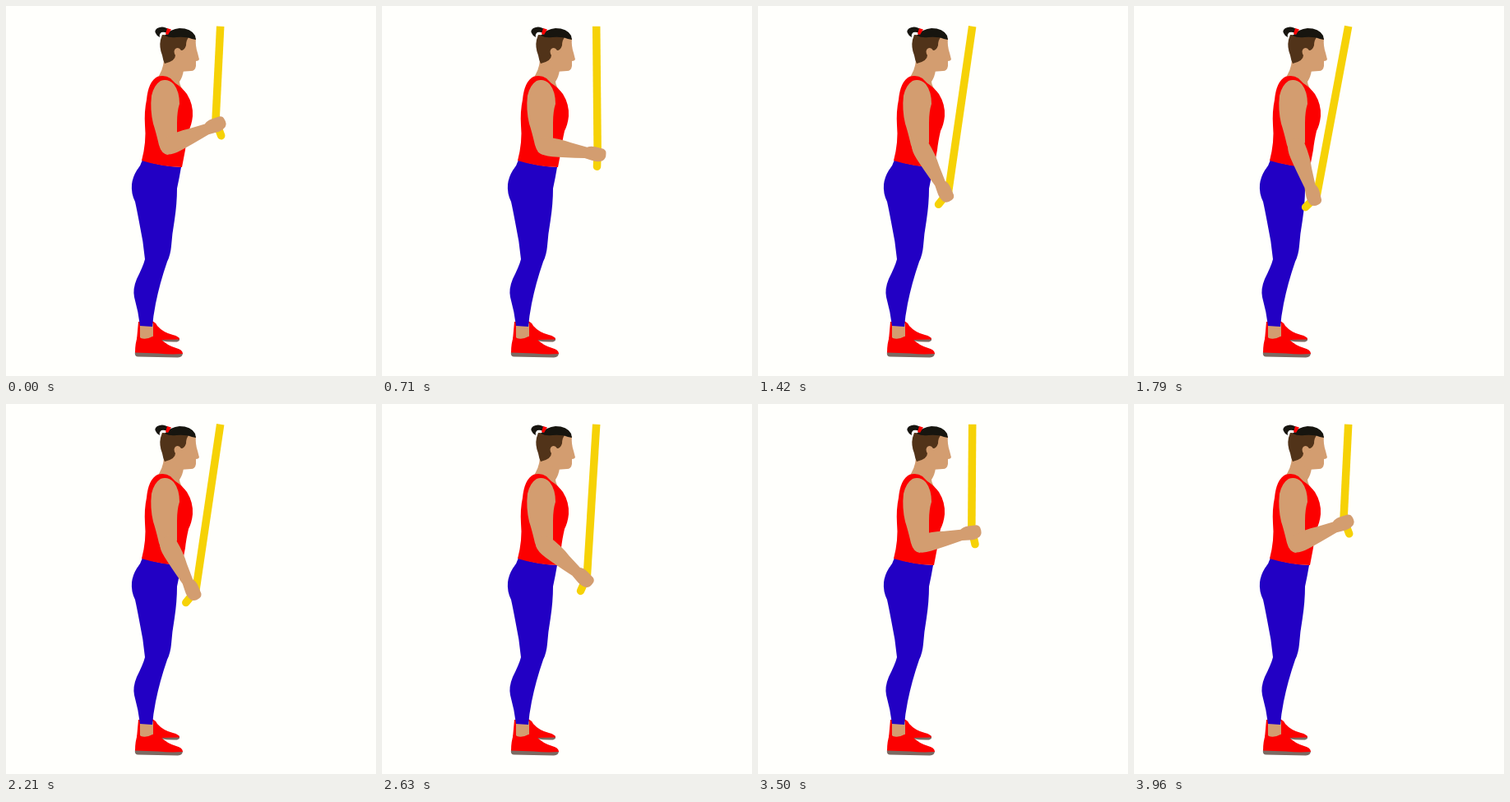
Recreate the animation shown at these times as an HTML page with a canvas. Size 450 by 450 pixels, loop 4000 ms.

```html
<!DOCTYPE html>
<html lang="en">
<head>
<meta charset="utf-8">
<title>Rope pushdown</title>
<style>
html, body { margin: 0; width: 100%; height: 100%; overflow: hidden; background: #fffffc; }
canvas { display: block; width: 450px; height: 450px; }
</style>
</head>
<body>
<canvas id="stage" width="450" height="450"></canvas>
<script>
const ctx = document.getElementById('stage').getContext('2d');
const LOOP = 4000, DOWN = 1780;
const UP_ANGLE = -24, SWING = 94.5;
const RAD = Math.PI / 180;
const ELBOW = { x: 197, y: 170.5 };
const GRIP = { x: 66, y: -4 };
const PAPER = '#fffffc', SKIN = '#d39d70', RED = '#fc0000', BLUE = '#2200c4';
const HAIR = '#513319', DARK = '#17150f', SOLE = '#7b6a62', ROPE = '#f6d206';

const shape = (color, d) => ({ color, path: new Path2D(d) });

const body = [
  // far shoe
  shape(SOLE, 'M186 403 L210 403 Q213 407 208 408.5 Q198 409 188 407Z'),
  shape(RED, 'M161 384 L178 383 Q182 385 184 389 Q191 397 203 400 Q211 402 211 405.5 L188 406 L159 406Z'),
  // near leg
  shape(SKIN, 'M163 386 L179 386 L179 406 L163 407Z'),
  shape(SOLE, 'M157 420 Q156 426 160 426.5 L209 427.5 Q215 427 215 422Z'),
  shape(RED, 'M160 402 Q162 401 164 404 Q171 406 178 402 Q184 400 187 404 Q196 413 207 416 Q215 418 215 423 Q200 424 185 422.5 L157 421.5 Q157 410 160 402Z'),
  shape(BLUE, 'M166 187 Q188 195 213 196 Q211 208 208 222 Q208 240 205 260 Q202 277 201 292 Q200 303 196 311 Q187 337 182 362 Q179 377 178 390 L163 389 Q161 372 156 354 Q154 344 159 332 Q167 316 169 308 Q167 286 162 263 Q159 247 157 238 Q152 228 153 217 Q154 208 159 200 Q164 194 166 187Z'),
  // neck and chest
  shape(SKIN, 'M192 66 Q191 79 183 89 L203 98 L220 108 Q211 98 211 92 Q215 86 216 78 L212 62Z'),
  // vest
  shape(RED, 'M171 114 Q173 92 184 86 Q193 83 200 88 L206 94 Q214 99 220 107 Q228 120 227 134 Q226 144 222 152 Q219 165 218 175 L214 196 Q187 195 165 188 Q171 165 169 145 Q168 128 171 114Z'),
  // head
  shape(SKIN, 'M207 38 L231 39 Q230 48 233 57 L235 65 Q234 67 231 67 L231 73 Q230 79 225 79 L211 80 L200 66Z'),
  shape(HAIR, 'M190 35 L223 37 Q219 41 219 48 Q217 54 213 54 Q210 49 206 52 Q203 55 206 60 Q206 67 193 70 Q191 66 190 60 Q186 50 188 41Z'),
  shape(DARK, 'M193 36 Q200 28 211 27 Q225 27 230 36 L231 41 L226 40 Q219 37 207 38 Q199 39 193 36Z'),
  shape(DARK, 'M199 29 Q191 23 184 27 Q180 30 182 33 Q183 36 187 38 Q186 34 189 32 Q192 31 196 33Z'),
  shape(RED, 'M196 27 L201 28.5 L197 35 L194 34Z')
];

const upperArm = shape(SKIN, 'M177 109 Q180 96 188 91 Q197 88 204 95 Q211 104 211 119 Q208 128 208 142 L208 166 L197 181 Q189 180 186 169 Q182 152 179 143 Q175 126 177 109Z');
// drawn along x, starting at the elbow
const forearm = shape(SKIN, 'M0 -11 Q18 -12 32 -9 L52 -6.5 Q56 -9 62 -8.5 L72 -7.5 Q76 -6 76 -2 Q77 4 73 7 Q67 10 60 8.5 L51 7 Q26 10 12 11 Q0 12 -6 8 Q-13 -1 -6 -8Z');

function fill(s) {
  ctx.fillStyle = s.color;
  ctx.fill(s.path);
}

function forearmAngle(t) {
  const phase = t < DOWN ? t / DOWN : 1 + (t - DOWN) / (LOOP - DOWN);
  return UP_ANGLE + SWING * (1 - Math.cos(Math.PI * phase)) / 2;
}

function line(x1, y1, x2, y2) {
  ctx.beginPath();
  ctx.moveTo(x1, y1);
  ctx.lineTo(x2, y2);
  ctx.stroke();
}

function drawRope(angle) {
  const c = Math.cos(angle * RAD), s = Math.sin(angle * RAD);
  const x = ELBOW.x + GRIP.x * c - GRIP.y * s;
  const y = ELBOW.y + GRIP.x * s + GRIP.y * c;
  const tail = (0.7 * angle - 4) * RAD;
  ctx.strokeStyle = ROPE;
  ctx.lineWidth = 9.5;
  ctx.lineCap = 'butt';
  line(260.7, 24.7, x - 0.7, y);
  ctx.lineCap = 'round';
  line(x - 0.7, y, x - 0.7 - 19 * Math.sin(tail), y + 19 * Math.cos(tail));
}

function draw(t) {
  const angle = forearmAngle(t);
  ctx.fillStyle = PAPER;
  ctx.fillRect(0, 0, 450, 450);
  body.forEach(fill);
  drawRope(angle);
  fill(upperArm);
  ctx.save();
  ctx.translate(ELBOW.x, ELBOW.y);
  ctx.rotate(angle * RAD);
  fill(forearm);
  ctx.restore();
}

function tick() {
  draw(performance.now() % LOOP);
  requestAnimationFrame(tick);
}
tick();
</script>
</body>
</html>
```
